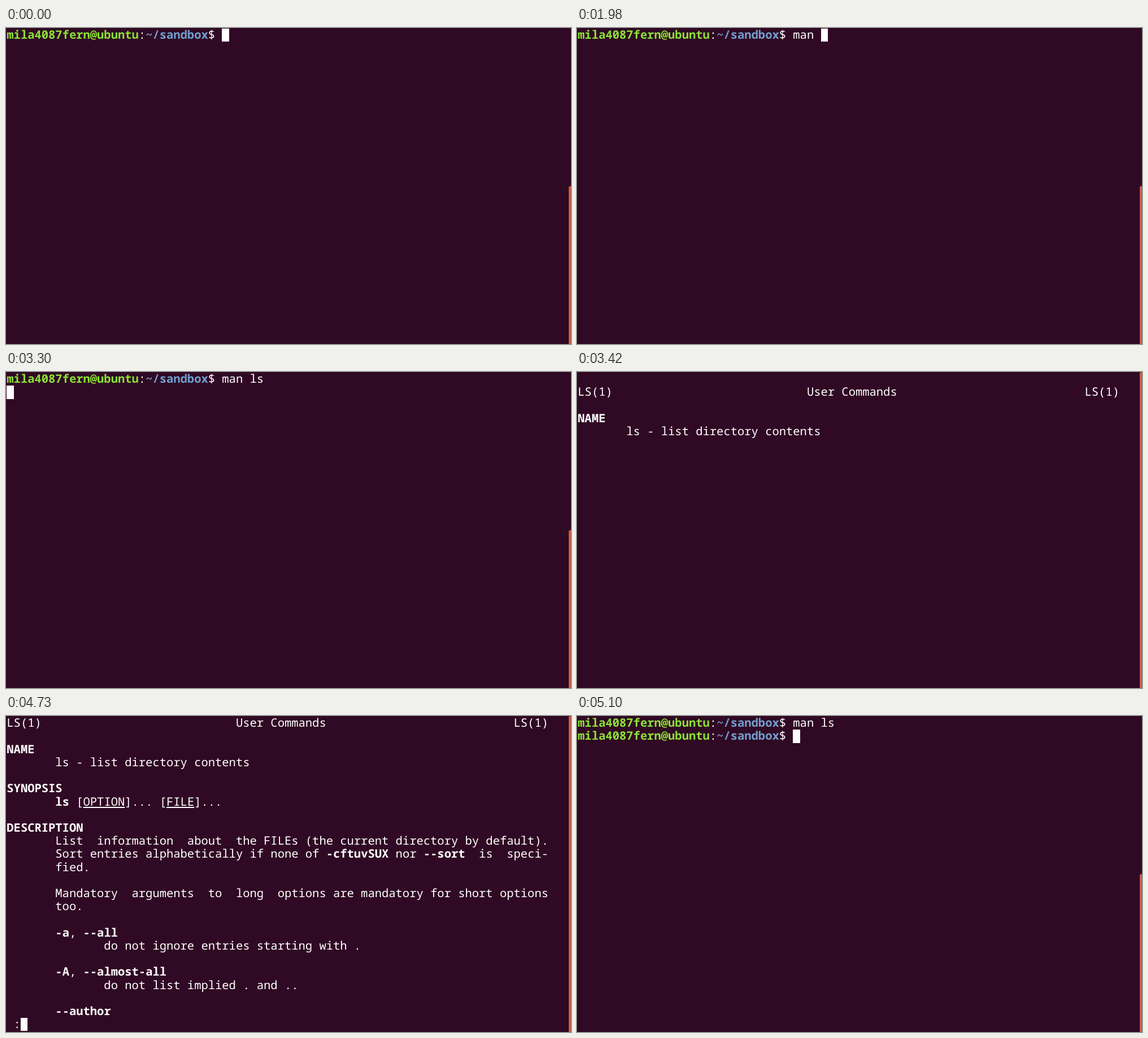
These frames come from a looping animation (1000 by 560 pixels, 7.88 s). An HTML page:

```html
<!DOCTYPE html>
<html lang="en">
<head>
<meta charset="utf-8">
<title>Terminal</title>
<style>
  html, body { margin: 0; width: 100%; height: 100%; overflow: hidden; background: #300a24; }
  #screen {
    position: absolute; left: 1.3px; top: 1.2px; margin: 0;
    font: 20.49px/23.22px "Noto Sans Mono", "DejaVu Sans Mono", monospace;
    color: #fff; white-space: pre;
    text-rendering: geometricPrecision; font-variant-ligatures: none;
  }
  b { font-weight: 700; }
  u { text-decoration-thickness: 1.5px; text-underline-offset: 2px; text-decoration-skip-ink: none; }
  .user { color: #8ae234; }
  .path { color: #729fcf; }
  .cursor, .status { display: inline-block; height: 23.22px; vertical-align: top; background: #fff; }
  .cursor { width: .6em; }
  .status { color: #300a24; }
  #thumb { position: absolute; left: 996px; width: 6px; bottom: 0; border-radius: 3px 0 0 0; background: #c8603f; }
</style>
</head>
<body>
<pre id="screen"></pre>
<div id="thumb"></div>
<script>
const LOOP = 7880;
const screenEl = document.getElementById('screen');
const thumb = document.getElementById('thumb');

const cursor = '<span class="cursor"></span>';
const prompt = '<b class="user">mila4087fern@ubuntu</b>:<b class="path">~/sandbox</b>$ ';
const command = 'man ls';
const status = '<span class="status"> Manual page ls(1) line 1 (press h for help or q to quit) </span>';

const manual = [
  'LS(1)'.padEnd(33) + 'User Commands'.padEnd(40) + 'LS(1)',
  '',
  '<b>NAME</b>',
  '       ls - list directory contents',
  '',
  '<b>SYNOPSIS</b>',
  '       <b>ls</b> [<u>OPTION</u>]... [<u>FILE</u>]...',
  '',
  '<b>DESCRIPTION</b>',
  '       List  information  about  the FILEs (the current directory by default).',
  '       Sort entries alphabetically if none of <b>-cftuvSUX</b> nor <b>--sort</b>  is  speci-',
  '       fied.',
  '',
  '       Mandatory  arguments  to  long  options are mandatory for short options',
  '       too.',
  '',
  '       <b>-a</b>, <b>--all</b>',
  '              do not ignore entries starting with .',
  '',
  '       <b>-A</b>, <b>--almost-all</b>',
  '              do not list implied . and ..',
  '',
  '       <b>--author</b>'
];

const typed = n => prompt + command.slice(0, n) + cursor;
const entered = prompt + command + '\n';
const page = footer => [...manual, footer].join('\n');

// [start in ms, screen content, pager open]
const steps = [
  ...[0, 930, 1080, 1280, 1980, 2890, 2990].map((at, n) => [at, typed(n)]),
  [3300, entered + cursor],
  [3370, cursor, true],
  [3420, '\n' + manual.slice(0, 4).join('\n'), true],
  [3520, page(status), true],
  [4730, page(' :' + cursor), true],
  [5000, entered + cursor],
  [5100, entered + typed(0)]
];

let shown;
function draw() {
  const t = performance.now() % LOOP;
  const step = steps.findLast(([at]) => at <= t);
  if (step !== shown) {
    shown = step;
    screenEl.innerHTML = step[1].replace(/^\n/, '\n\n').replace(/^\n\n/, ' \n');
    thumb.style.top = step[2] ? '0' : '280px';
  }
  requestAnimationFrame(draw);
}
draw();
</script>
</body>
</html>
```
